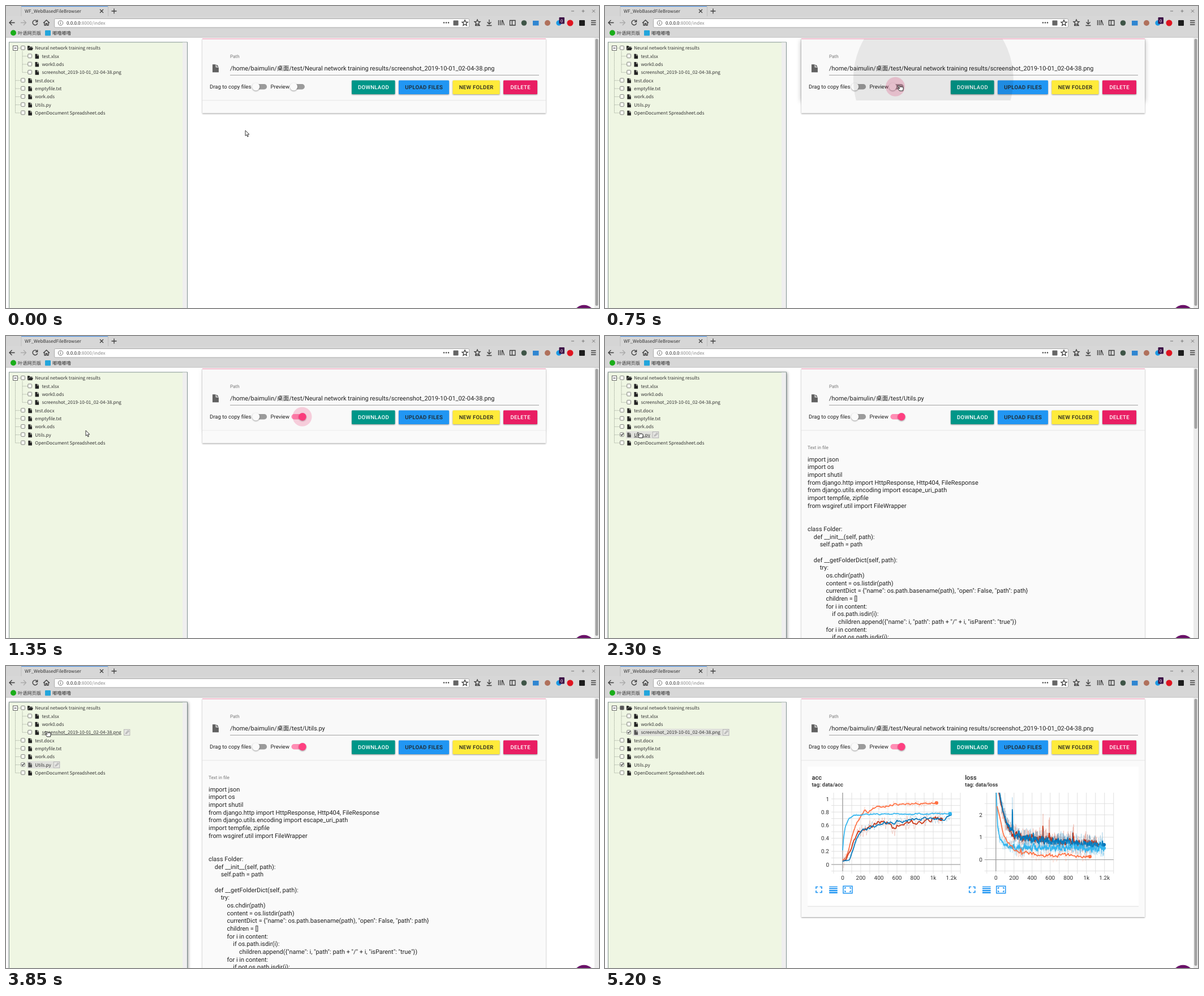
Write an HTML page that moves like this. It is 1048x534 px and loops after 5250 ms.

```html
<!DOCTYPE html>
<html lang="en">
<head>
<meta charset="utf-8">
<title>File browser</title>
<style>
html, body { margin: 0; height: 100%; overflow: hidden; background: #fff; }
svg { display: block; width: 100%; height: 100%; }
text { font-family: Roboto, "Noto Sans CJK SC", "Noto Sans CJK", sans-serif; white-space: pre; text-rendering: geometricPrecision; }
.ui text, text.ui { font-family: "Noto Sans CJK SC", "Noto Sans CJK", "Noto Sans", sans-serif; }
.raised { filter: drop-shadow(0 1px 1.2px rgba(0,0,0,.4)); }
.line { fill: none; stroke: #3c3c3c; stroke-width: 1.3; }
</style>
</head>
<body>
<svg id="stage" viewBox="0 0 1048 534"></svg>
<script>
const LOOP = 5250;
const INK = '#212121';
const rect = (x, y, w, h, fill, more = '') => `<rect x="${x}" y="${y}" width="${w}" height="${h}" fill="${fill}" ${more}/>`;
const circle = (x, y, r, fill, more = '') => `<circle cx="${x}" cy="${y}" r="${r}" fill="${fill}" ${more}/>`;
const text = (x, y, s, size = 8.05, fill = INK, more = '') => `<text x="${x}" y="${y}" font-size="${size}" fill="${fill}" ${more}>${s}</text>`;
const path = (d, more = 'class="line"') => `<path d="${d}" ${more}/>`;
const at = (x, y, body) => `<g transform="translate(${x} ${y})">${body}</g>`;
const clamp = v => Math.max(0, Math.min(1, v));
const span = (t, a, b) => clamp((t - a) / (b - a));
const mix = (a, b, p) => a + (b - a) * p;
const fileIcon = (x, y, k = 1, fill = '#222') =>
  at(x, y, path('M-3.5-4.7H.3V-1.2H3.8V4.7H-3.5ZM1.1-4.7L3.8-2H1.1Z', `fill="${fill}" transform="scale(${k})"`));

function browser() {
  const star = path('M0-5L1.5-1.6 5-1.3 2.3 1 3.2 4.6 0 2.7-3.2 4.6-2.3 1-5-1.3-1.5-1.6Z');
  return `<g class="ui">` +
    rect(0, 0, 1048, 18, '#d5d5d5') + rect(0, 18, 1048, 38, '#d7d7d7') + rect(0, 55.3, 1048, .7, '#bdbdbd') +
    rect(27, 0, 153, 18, '#d7d7d7') + rect(27, 0, 153, 1.2, '#5294e2') +
    path('M27 1V18M180.5 1V18', 'stroke="#b5b5b5" stroke-width=".7"') +
    text(33, 12.2, 'WF_WebBasedFileBrowser', 8.05, '#333') +
    path('M166 6l6 6m0-6l-6 6M186.5 9h9M191 4.5v9') +
    path('M999 9h5M1017.5 9h5M1020 6.5v5M1036 6.5l5 5m0-5l-5 5', 'stroke="#777" fill="none"') +
    path('M15.5 29.5H6M10.5 25l-4.5 4.5 4.5 4.5') +
    path('M26 29.5h9.5M31 25l4.5 4.5-4.5 4.5', 'class="line" style="stroke:#aaa"') +
    path('M55 27a4.3 4.3 0 1 0 .6 3.5M55.7 24.5v3.5h-3.5') +
    path('M66 30l5.5-5 5.5 5M68 29v5h2.5v-3h2v3H75v-5') +
    rect(85.5, 22.5, 733, 15.5, '#fff', 'rx="2" stroke="#ababab"') +
    circle(96.5, 30, 4.2, 'none', 'stroke="#666" stroke-width=".9"') + path('M96.5 29.5v2.5M96.5 27.5v1', 'stroke="#666"') +
    text(107, 33.2, '0.0.0.0<tspan fill="#8a8a8a">:8000/index</tspan>') +
    [774, 778, 782].map(x => circle(x, 29.5, 1.2, '#444')).join('') +
    rect(790.5, 25.5, 9, 9, '#666', 'rx="1"') +
    at(811, 29.8, star) + at(833, 29, star) + path('M829 34.5h9') +
    path('M854 24v8M850.5 28.5l3.5 3.5 3.5-3.5M849.5 34.5h9') +
    path('M870.5 25v9M873.5 25v9M876.5 25v9M877.5 25l3 9') +
    path('M890.5 25.5h9.5v8.5h-9.5zM894.5 25.5v8.5') +
    circle(915.5, 30, 4.8, '#3f5547') + rect(931, 26, 10.5, 8.5, '#2f86d1') +
    circle(957, 30, 5, '#b0715c') + circle(977, 30, 4.7, '#1b9ae4') +
    rect(977.5, 20, 9.5, 11.5, '#3d1147', 'rx="1"') + text(980, 28.5, '0', 7.5, '#fff') +
    circle(997, 30, 5.5, '#df1420') + rect(1013, 25, 10, 10, '#1c1c1c', 'rx="1"') +
    path('M1034 26h8.5M1034 29.5h8.5M1034 33h8.5') +
    circle(13, 47.5, 5, '#1aad19') + text(21, 51, '叶语网页版', 8.2, '#333') +
    rect(69, 43, 10, 9.5, '#22a5dc', 'rx="1"') + text(82, 51, '嘟噜嘟噜', 8.25, '#333') + `</g>`;
}

const rows = [
  ['Neural network training results', 0], ['test.xlsx', 1], ['work0.ods', 1], ['screenshot_2019-10-01_02-04-38.png', 1],
  ['test.docx', 0], ['emptyfile.txt', 0], ['work.ods', 0], ['Utils.py', 0], ['OpenDocument Spreadsheet.ods', 0]
];
const rowY = i => 74.4 + 14.33 * i;

function treeLines() {
  let d = `M16.5 80V${rowY(8)}M29 80V${rowY(3)}M21 74.4H26`;
  rows.forEach(([, level], i) => { if (i) d += `M${level ? 29 : 16.5} ${rowY(i)}h9`; });
  return path(d, 'fill="none" stroke="#a0a89a" stroke-width=".9" stroke-dasharray="1 .6"') +
    rect(12.5, 70.4, 8, 8, '#fff', 'stroke="#555" stroke-width=".9"') + path('M14.5 74.4h4', 'stroke="#222"') +
    at(42.5, 74.4, path('M-4.5 3.8V-3.8H-1L0-2.5H4V-1H-2.2L-4 3.5ZM-3.8 3.9L-1.8-.3H5.5L3.8 3.9Z', 'fill="#222"'));
}

function treeRow(i, { hover, selected, checked, half }) {
  const [name, level] = rows[i], x = 30 + 12.2 * level, y = rowY(i), textX = x + 21.2;
  measure.textContent = name;
  const end = textX + measure.getComputedTextLength();
  const active = hover === i || selected === i;
  return (selected === i ? rect(x + 7, y - 6.5, end - x + 9, 13, '#e0e1dc') : '') +
    rect(x - 3.4, y - 3.8, 6.8, 6.8, half && !i ? '#555' : '#f8fbf2', 'rx="1.2" stroke="#777" stroke-width=".9"') +
    (checked.includes(i) ? path(`M${x - 2} ${y - .5}l1.5 1.7 3-3.7`) : '') +
    (i ? fileIcon(x + 12.5, y + .2, .9, selected === i ? '#555' : '#222') : '') +
    text(textX, y + 2.9, name, 8.05, '#333', hover === i ? 'text-decoration="underline"' : '') +
    (active ? rect(end + 4.5, y - 5.2, 10.5, 10.5, '#e6e6e3', 'stroke="#aaa" stroke-width=".8"') +
      path(`M${end + 7.5} ${y + 2.5}l1-2.5 3.5-3.5 1.5 1.5-3.5 3.5z`, 'fill="#ccc" stroke="#999" stroke-width=".8"') : '');
}

const code = `import json
import os
import shutil
from django.http import HttpResponse, Http404, FileResponse
from django.utils.encoding import escape_uri_path
import tempfile, zipfile
from wsgiref.util import FileWrapper


class Folder:
    def __init__(self, path):
        self.path = path

    def __getFolderDict(self, path):
        try:
            os.chdir(path)
            content = os.listdir(path)
            currentDict = {"name": os.path.basename(path), "open": False, "path": path}
            children = []
            for i in content:
                if os.path.isdir(i):
                    children.append({"name": i, "path": path + "/" + i, "isParent": "true"})
            for i in content:
                if not os.path.isdir(i):`;
const codeView = text(358, 200.3, 'Text in file', 8.19, '#777') +
  code.split('\n').map((s, i) => text(358, 221.8 + 13.67 * i, s, 10.92)).join('');

// Seeded noise around a polyline, with a paler and rougher copy behind it.
function curve(points, color, noise, seed, step, spikes = {}) {
  const random = () => (seed = seed * 16807 % 2147483647) / 2147483647 - .5;
  const last = points.length - 1;
  let smooth = '', raw = '', drift = 0, k = 0;
  for (let x = points[0][0]; x <= points[last][0]; x += step) {
    while (k < last - 1 && points[k + 1][0] < x) k++;
    const [x0, y0] = points[k], [x1, y1] = points[k + 1];
    const y = mix(y0, y1, (x - x0) / (x1 - x0));
    drift = drift * .6 + random() * noise * span(x, points[0][0], points[0][0] + 30);
    const spike = spikes[Math.round(x)] || 0;
    smooth += `${x.toFixed(1)},${(y + drift - spike).toFixed(1)} `;
    raw += `${x.toFixed(1)},${(y + drift + random() * (noise * 3 + 2) - spike * 2).toFixed(1)} `;
  }
  const stroke = `fill="none" stroke="${color}" stroke-linejoin="round"`;
  return `<polyline points="${raw}" ${stroke} opacity=".2"/><polyline points="${smooth}" ${stroke} stroke-width="1.7"/>` +
    circle(points[last][0], points[last][1], 3.1, color);
}

function chart(x, name, zeroY, stepY, labels, unit, curves) {
  const x0 = x + 16;
  const left = x - 38.5;
  let grid = '', out = '';
  for (let i = 0; i <= 14; i++) grid += `M${x + 16 * i} 224V367`;
  for (let y = zeroY + stepY; y >= 224; y -= stepY) if (y < 364) grid += `M${x - 4} ${y}H${x + 224}`;
  out += path(grid, 'stroke="#dedede" stroke-width=".9"') +
    path(`M${x0} 224V363M${x - 4} ${zeroY}H${x + 224}`, 'stroke="#999" stroke-width="1.2"');
  ['0', '200', '400', '600', '800', '1k', '1.2k'].forEach((s, i) => out += text(x0 + 32 * i, 377.6, s, 10, '#333', 'text-anchor="middle"'));
  labels.forEach(v => out += text(x - 8, zeroY - v * unit + 3.6, v, 10, '#333', 'text-anchor="end"'));
  out += text(left, 200.6, name, 11, INK, 'font-weight="500"') + text(left, 212.6, 'tag: data/' + name, 9.4, INK, 'font-weight="500"');
  const icon = (dx, d, width) => at(left + dx, 395.5, path(d, `fill="none" stroke="#2196f3" stroke-width="${width}"`));
  out += icon(12.5, 'M-5-1.5V-5H-1.5M1.5-5H5V-1.5M5 1.5V5H1.5M-1.5 5H-5V1.5', 1.7);
  out += at(left + 38, 395.5, [[-6, 1.3], [-3.2, 2], [.3, 2.5], [4, 2.5]].map(([y, h]) => rect(-7.3, y, 14.6, h, '#2196f3')).join(''));
  out += icon(63.5, 'M-8-6.2H8V6.2H-8ZM-5-1.5V-3.5H-3M3-3.5H5V-1.5M5 1.5V3.5H3M-3 3.5H-5V1.5', 1.5);
  return out + `<g clip-path="url(#plot)">${curves}</g>`;
}

const ORANGE = '#ff7043', SKY = '#33b5ee', RED = '#cc3311', BLUE = '#0077bb';
const accCurves =
  curve([[420, 343], [425, 340], [430, 328], [436, 303], [444, 280], [452, 264], [460, 252], [464, 261], [468, 254], [480, 250], [510, 245], [586, 242]], ORANGE, 3, 11, 1.5) +
  curve([[420, 345], [426, 342], [433, 327], [440, 308], [448, 293], [470, 287], [485, 277], [501, 277], [507, 286], [520, 277], [560, 275], [594, 271]], RED, 8, 37, 2) +
  curve([[420, 345], [432, 343], [438, 326], [446, 304], [455, 290], [480, 284], [500, 277], [540, 272], [580, 269], [602, 269], [610, 262]], BLUE, 5, 51, 2) +
  curve([[420, 326], [422, 300], [425, 283], [431, 270], [440, 264], [460, 262], [610, 261]], SKY, 1.8, 23, 1.5);
const lossCurves =
  curve([[693, 205], [700, 245], [708, 275], [720, 296], [740, 303], [800, 309], [870, 316]], RED, 10, 71, .4, { 774: 23, 785: 12, 827: 18, 828: 10 }) +
  curve([[695, 212], [703, 255], [712, 283], [724, 298], [740, 304], [790, 310], [882, 316]], BLUE, 10, 83, .4, { 720: 35, 757: 8 }) +
  curve([[691, 210], [694, 285], [698, 306], [705, 315], [720, 320], [882, 322]], SKY, 8, 97, .4) +
  curve([[693, 248], [698, 268], [704, 298], [712, 313], [724, 323], [740, 331], [780, 335], [857, 337]], ORANGE, 6, 113, 1.5, { 735: 10 });
const chartView = rect(358, 178, 585, 247, '#fff') + rect(358, 424.5, 585, 1, '#dedede') +
  chart(404, 'acc', 351, 11.6, [0, .2, .4, .6, .8, 1], 116, accCurves) +
  chart(674.8, 'loss', 342.5, 19.85, [0, 1, 2], 39.7, lossCurves);

const button = (x, w, s, fill, ink) => rect(x, 131.6, w, 24.5, fill, 'rx="1.4" class="raised"') +
  text(x + w / 2 + .2, 147.2, s, 9.55, ink, 'font-weight="500" letter-spacing=".34" text-anchor="middle"');
const controls = text(396, 91.8, 'Path', 8.19, '#777') + fileIcon(370.2, 110.2, 1.5, '#616161') +
  rect(396, 121.8, 546, .9, '#949494') +
  text(360, 146, 'Drag to copy files', 9.55) + text(467.5, 146, 'Preview', 9.55) +
  button(611, 76.5, 'DOWNLAOD', '#009688', '#fff') + button(694, 89, 'UPLOAD FILES', '#2196f3', INK) +
  button(789.5, 83, 'NEW FOLDER', '#ffeb3b', INK) + button(879, 60, 'DELETE', '#e91e63', '#fff');

function toggle(x, on) {
  return rect(x, 138.1, 23.5, 9.4, on > .5 ? '#ff8db4' : '#9b9b9b', 'rx="4.7"') +
    circle(x + 4 + 15.6 * on, 142.8, 6.7, on > .5 ? '#ff4081' : '#fafafa', 'class="raised"');
}

const arrow = path('M0 0V9.5L2.2 7.6 3.8 11.2 5.3 10.5 3.8 7H6.8Z', 'fill="#fff" stroke="#222" stroke-width=".9"');
const hand = path('M-2.5 1.2Q-3.5-.8-1.5-.3L1.5 2H5.5Q7.5 2.5 7.2 5L6.5 9H.5L-2 5.5Q-2.5 4.2-.8 4.5L.5 5V3.5Z', 'fill="#fff" stroke="#222"');

function cursor(t) {
  if (t >= 5200) return '';
  if (t >= 4900) return at(5, 6, arrow);
  const stops = [[4550, 70, 121], [4200, 85, 120], [3850, 72, 116], [3500, 70, 125], [3150, 70, 154], [2300, 60, 171]];
  const stop = stops.find(s => t >= s[0]);
  if (stop) return at(stop[1], stop[2], hand);
  const go = span(t, 200, 650), back = span(t, 850, 1350);
  const x = back ? mix(520, 141, back) : mix(423, 520, go);
  const y = back ? mix(141, 167, back) : mix(220, 141, go);
  return at(x, y, x > 500 ? hand : arrow);
}

function header(t, lift) {
  const on = span(t, 750, 900);
  const file = t >= 2300 && t < 4200 ? 'Utils.py' : 'Neural network training results/' + rows[3][0];
  const grow = 1 - (1 - span(t, 660, 1000)) ** 2, fade = 1 - span(t, 900, 1300);
  const halo = t < 2300 ? span(t, 650, 750) : 0;
  return rect(347, 58, 607, 109, '#f9f9f9') +
    rect(347, 166.5, 607, .8, '#e2e2e2', `opacity="${1 - lift}"`) + rect(347, 57, 607, 2, '#f3bfd0') + controls +
    text(396, 113.5, '/home/baimulin/桌面/test/' + file, 10.92) +
    toggle(437.6, 0) + toggle(504.4, on) +
    (halo ? circle(mix(513, 523.5, on), 142.8, 17 * halo, '#e91e63', 'opacity=".2"') : '') +
    (grow ? circle(mix(521, 650, grow), mix(143, 113, grow), 308 * grow, '#000', `opacity="${.075 * fade}" clip-path="url(#head)"`) : '');
}

function scene(t) {
  const hover = t >= 4900 ? -1 : t >= 3850 ? 3 : t >= 3500 ? 4 : t >= 3150 ? 6 : t >= 2300 ? 7 : -1;
  const opened = t >= 2300, charts = t >= 4200;
  const state = { hover, selected: charts ? 3 : opened ? 7 : -1, checked: charts ? [3, 7] : opened ? [7] : [], half: charts };
  const glow = opened && t < 5200 ? 'style="filter:drop-shadow(1px 1px 2.5px rgba(0,0,0,.45))"' : '';
  const cardEnd = charts ? 444 : opened ? 560 : 189.5;
  const lift = opened ? 0 : span(t, 350, 600) * (1 - .75 * span(t, 950, 1350));
  // The raised header casts its shadow behind the card body.
  const headShadow = rect(347, 58, 607, 109, '#fafafa', `style="filter:drop-shadow(0 2px 4px rgba(0,0,0,${.3 * lift}))"`);
  return rect(5.5, 64, 315, 490, '#eff6e3', `stroke="#617775" stroke-width=".8" ${glow}`) + rect(312, 64.5, 8, 480, '#efefef') +
    `<g class="ui">${treeLines()}${rows.map((_, i) => treeRow(i, state)).join('')}</g>` +
    headShadow + rect(347, 58, 607, cardEnd - 58, '#fafafa', 'class="raised"') + header(t, lift) +
    (charts ? chartView : opened ? codeView : '') +
    rect(1040, 56, 8, 478, '#ececec') + rect(1041.5, 58, 5, opened && !charts ? 106 : 472, '#a2a2a2', 'rx="2.5"') +
    circle(1021.5, 547.7, 19, '#6a1068', 'class="raised"');
}

const stage = document.getElementById('stage');
stage.innerHTML = `<defs><clipPath id="head">${rect(347, 58, 607, 109, '#000')}</clipPath>` +
  `<clipPath id="plot">${rect(404, 224, 500, 139, '#000')}</clipPath></defs>` +
  rect(0, 0, 1048, 534, '#fff') + '<g id="page"></g>' + browser() + text(0, -20, '', 8.05, INK, 'id="measure" class="ui"') + '<g id="pointer"></g>';
const page = document.getElementById('page');
const measure = document.getElementById('measure');
const pointer = document.getElementById('pointer');
let shown = -1;
function tick() {
  const t = Math.floor(performance.now() % LOOP / 50) * 50;
  if (t !== shown) {
    page.innerHTML = scene(t);
    pointer.innerHTML = cursor(t);
    shown = t;
  }
  requestAnimationFrame(tick);
}
tick();
</script>
</body>
</html>
```
